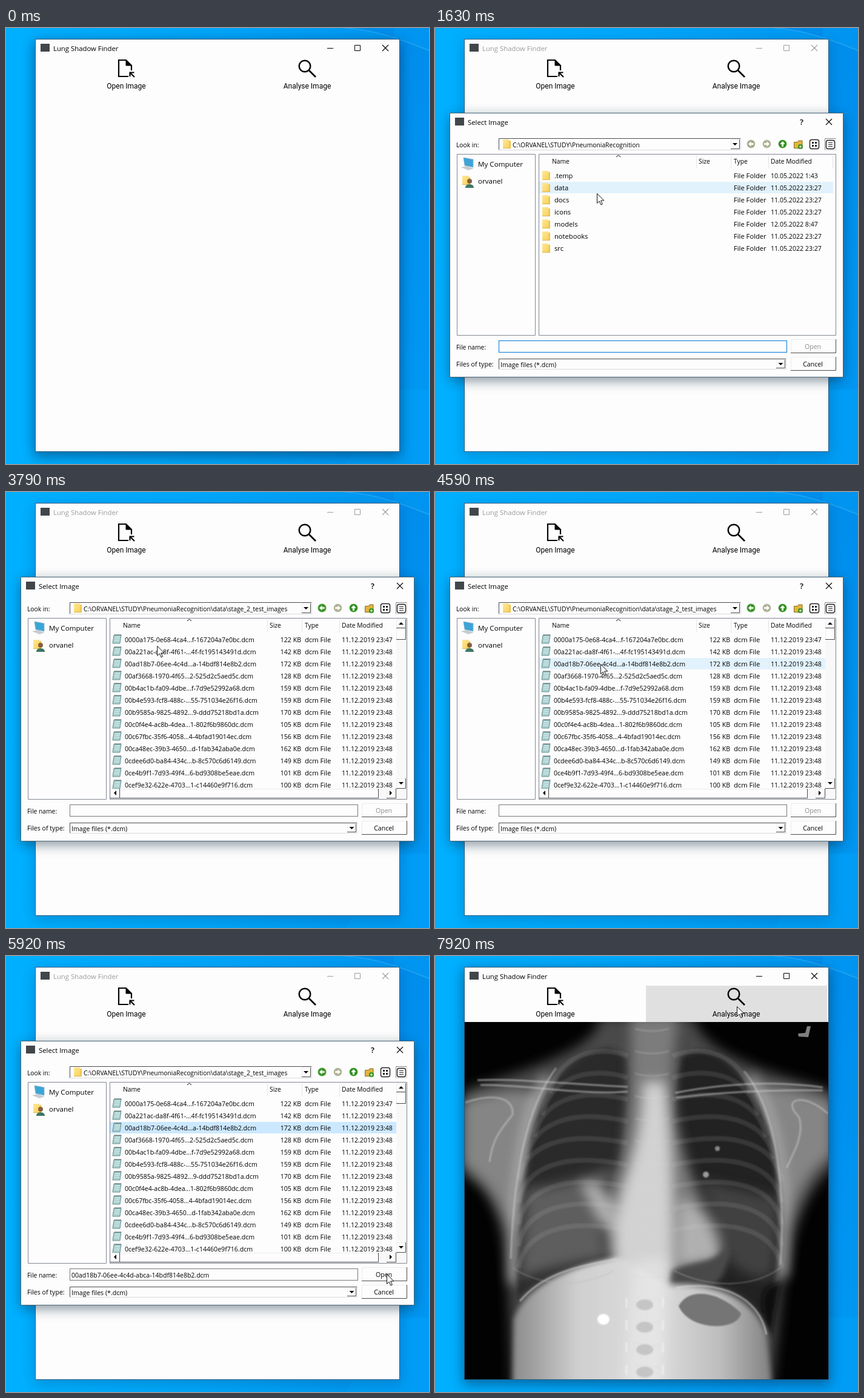
Write an HTML page that moves like this. It is 698x720 px and loops after 8 s.

```html
<!DOCTYPE html>
<html lang="en">
<head>
<meta charset="utf-8">
<title>Lung Shadow Finder</title>
<style>
html, body { margin: 0; width: 100%; height: 100%; overflow: hidden; background: #009cf4; }
svg { display: block; }
text { font: 10.6px "Open Sans", "Noto Sans", sans-serif; fill: #000; white-space: pre; }
.label { font: 12px Roboto, sans-serif; text-anchor: middle; }
.cap { font-size: 11.35px; }
.side { font-size: 11.6px; }
.head { font-size: 10.3px; }
.name, .type { font-size: 11.2px; }
.path { font-size: 10.3px; }
.mid { text-anchor: middle; }
.end { text-anchor: end; }
.line { fill: none; stroke: currentColor; }
.off { fill: #8c8c8c; }

/* every layer shares one 8 s clock */
.t { animation: 8s step-end infinite; }
.chrome { color: #000; animation-name: dim; }
.chrome text { fill: currentColor; }
.glow { animation-name: glow; }
.dialog { opacity: 0; animation-name: dialog; animation-timing-function: linear; }
.overOpen { animation-name: overOpen; }
.overAnalyse { animation-name: overAnalyse; }
.root { animation-name: root; }
.data { animation-name: data; }
.test { animation-name: test; }
.went { animation-name: went; }
.focus { animation-name: focus; }
.hot0 { animation-name: hot0; }
.hot1 { animation-name: hot1; }
.hot2 { animation-name: hot2; }
.picked { animation-name: picked; }
.unpicked { animation-name: unpicked; }
.scan { animation-name: scan; }
.pointer { animation: move 8s linear infinite; }

@keyframes dim { 0%, 79.2% { color: #000 } 13.6% { color: #9c9c9c } }
@keyframes glow { 0%, 79.2% { opacity: .6 } 13.6% { opacity: .25 } }
@keyframes dialog { 0%, 13.4% { opacity: 0 } 15%, 78.4% { opacity: 1 } 79.6%, 100% { opacity: 0 } }
@keyframes overOpen { 0%, 13.6% { opacity: 0 } 9.8% { opacity: 1 } }
@keyframes overAnalyse { 0% { opacity: 0 } 92.6%, 100% { opacity: 1 } }
@keyframes root { 0% { opacity: 1 } 31.5%, 100% { opacity: 0 } }
@keyframes data { 0%, 46% { opacity: 0 } 31.5% { opacity: 1 } }
@keyframes test { 0% { opacity: 0 } 46%, 100% { opacity: 1 } }
@keyframes went { 0% { opacity: 0 } 31.5%, 100% { opacity: 1 } }
@keyframes focus { 0% { opacity: 1 } 27%, 100% { opacity: 0 } }
@keyframes hot0 { 0% { opacity: 0 } 19.2%, 100% { opacity: 1 } }
@keyframes hot1 { 0% { opacity: 0 } 37%, 100% { opacity: 1 } }
@keyframes hot2 { 0%, 59.2% { opacity: 0 } 50.5% { opacity: 1 } }
@keyframes picked { 0% { opacity: 0 } 59.2%, 100% { opacity: 1 } }
@keyframes unpicked { 0% { opacity: 1 } 59.2%, 100% { opacity: 0 } }
@keyframes scan { 0% { opacity: 0 } 87%, 100% { opacity: 1 } }
@keyframes move {
  0%, .45% { transform: translate(430px, 732px) }
  6.5% { transform: translate(275px, 270px) }
  10.5% { transform: translate(205px, 82px) }
  14% { transform: translate(206px, 84px) }
  18% { transform: translate(258px, 240px) }
  20.4% { transform: translate(267px, 273px) }
  23%, 29% { transform: translate(260px, 265px) }
  31.5% { transform: translate(254px, 266px) }
  35.5% { transform: translate(242px, 259px) }
  38.6%, 46% { transform: translate(243px, 246px) }
  52%, 55.75% { transform: translate(270px, 280px) }
  57.4%, 60% { transform: translate(273px, 284px) }
  65.5% { transform: translate(435px, 395px) }
  71% { transform: translate(600px, 505px) }
  74%, 79.5% { transform: translate(628px, 525px) }
  83.9% { transform: translate(566px, 460px) }
  89% { transform: translate(521px, 235px) }
  93.25%, 96.9% { transform: translate(499px, 86px) }
  99%, 100% { transform: translate(498px, 83px) }
}
</style>
</head>
<body>
<svg width="698" height="720" viewBox="0 0 698 720">
<defs>
  <linearGradient id="sky">
    <stop offset="0" stop-color="#00b0ff"/><stop offset=".5" stop-color="#00a6fa"/>
    <stop offset="1" stop-color="#0094f0"/>
  </linearGradient>
  <linearGradient id="wave" x1="0" y1="0" x2="0" y2="1">
    <stop offset="0" stop-color="#0088ea"/><stop offset="1" stop-color="#0098f2"/>
  </linearGradient>
  <linearGradient id="gold" x2="1" y2="1">
    <stop offset="0" stop-color="#ffe793"/><stop offset="1" stop-color="#f7cf58"/>
  </linearGradient>
  <linearGradient id="belly">
    <stop offset="0" stop-color="#8a8a8a"/><stop offset=".25" stop-color="#cfcfcf"/>
    <stop offset=".55" stop-color="#dedede"/><stop offset=".8" stop-color="#bdbdbd"/>
    <stop offset="1" stop-color="#808080"/>
  </linearGradient>
  <filter id="b1"><feGaussianBlur stdDeviation="1.2"/></filter>
  <filter id="b4" x="-30%" y="-30%" width="160%" height="160%"><feGaussianBlur stdDeviation="4"/></filter>
  <filter id="b10" x="-40%" y="-40%" width="180%" height="180%"><feGaussianBlur stdDeviation="10"/></filter>
  <clipPath id="plate"><path d="M49 109H649V699H49z"/></clipPath>
  <g id="folder">
    <path d="M0 0H10V2H13V15H0z" fill="url(#gold)"/><path d="M10.5 2V15H13V2z" fill="#edc552"/>
    <path d="M0 14.5H13" stroke="#dcb648"/>
  </g>
  <g id="note">
    <path d="M2 1.5H14L12 15H0z" fill="#a8d0cf" stroke="#6a8f92"/>
    <path d="M4 4.5H12M3.5 7.5H11.5M3 10.5H11" stroke="#dff0ee"/>
    <path d="M3 1H14" stroke="#566266" stroke-width="2" stroke-dasharray="1 1"/>
  </g>
  <g id="arrow">
    <circle r="7" stroke="#fff" stroke-opacity=".5"/>
    <path d="M-4.5 0L0-4.3V-1.6H4.2V1.6H0V4.3z" fill="#fff"/>
  </g>
  <path id="down" d="M-4-2H4L0 2z"/>
  <g id="cross"><path class="line" d="M-5-5L5 5M5-5L-5 5" stroke-width="1.1"/></g>
</defs>

<rect width="698" height="720" fill="url(#sky)"/>
<path d="M560 0C620 5 660 22 698 38V597H640V0z" fill="url(#wave)" opacity=".6"/>
<path d="M640 597H698V720H560z" fill="#00a2f8" opacity=".6"/>
<path d="M560 0C615 4 655 20 698 37" fill="none" stroke="#48b8fa" stroke-width="1.5" opacity=".5"/>

<rect class="t glow" x="46" y="22" width="606" height="686" fill="#003c6c" filter="url(#b10)"/>
<rect x="48.5" y="18.5" width="601" height="681" fill="#fdfdfd" stroke="#235a80"/>

<rect class="t overOpen" x="49" y="49" width="299" height="60" fill="#e0e0e0"/>
<rect class="t overAnalyse" x="348" y="49" width="299" height="60" fill="#e0e0e0"/>

<g class="t chrome">
  <rect x="57" y="26" width="15" height="13" fill="#41464a"/>
  <text class="cap" x="78" y="38">Lung Shadow Finder</text>
  <path class="line" d="M530 33.5H540M575.5 28.5H584.5V37.5H575.5z"/>
  <use href="#cross" x="626" y="33"/>
</g>
<g fill="none" stroke="#050505" stroke-width="2.2">
  <path d="M202 80H186V53H198L207 62V70"/>
  <path d="M198 53V62H207z" fill="#050505" stroke-width="1"/>
  <path d="M212 81L205 74M204.5 80V73.5H211.5"/>
  <circle cx="493" cy="63" r="9.3" stroke-width="2.5"/>
  <path d="M499.5 69.5L511 81" stroke-width="2.7"/>
</g>
<text class="label" x="198.5" y="100">Open Image</text>
<text class="label" x="497" y="100">Analyse Image</text>

<g class="t scan" clip-path="url(#plate)">
  <path d="M49 109H649V699H49z" fill="#020202"/>
  <path d="M272 100C270 150 175 180 49 222V362C95 385 112 440 120 520L128 710H556L572 560C585 480 600 400 655 350V222C540 190 440 160 426 100z" fill="#4a4a4a" filter="url(#b10)"/>
  <g filter="url(#b10)">
    <path d="M45 240C100 225 150 215 170 230C145 290 135 350 135 480C105 410 100 380 45 345zM655 240C600 220 540 210 525 220C560 280 580 360 578 470C595 390 620 350 655 330z" fill="#858585"/>
    <path d="M185 200C145 280 130 400 130 540M520 200C562 270 580 390 573 530" fill="none" stroke="#b4b4b4" stroke-width="15"/>
  </g>
  <g filter="url(#b4)">
    <path d="M290 152C215 155 170 235 154 330C142 420 139 480 134 572C165 525 235 512 298 500C270 450 280 390 304 340C318 270 326 190 315 165z" fill="#2c2c2c"/>
    <path d="M405 168C470 125 535 220 558 320C574 410 569 500 548 622C530 560 470 532 392 540C380 440 388 340 392 260z" fill="#232323"/>
  </g>
  <g filter="url(#b10)">
    <path d="M150 385C205 380 260 365 296 345C268 420 270 470 290 498C220 508 165 520 140 535z" fill="#6c6c6c" opacity=".8"/>
    <path d="M440 370L566 400C570 460 560 510 555 530C525 535 500 520 485 500z" fill="#505050" opacity=".7"/>
    <path d="M322 100H402C388 190 392 240 402 290C416 350 430 390 460 440C480 480 478 515 456 534H316C272 470 278 420 306 350C320 280 326 190 322 100z" fill="#7c7c7c"/>
    <path d="M345 210H378C388 300 394 390 390 560H300C290 470 300 415 322 350C338 300 345 260 345 210z" fill="#d2d2d2"/>
    <path d="M240 370C275 375 300 400 300 455C270 450 262 415 240 370zM405 400C440 420 465 450 470 500L400 510z" fill="#b0b0b0"/>
  </g>
  <g filter="url(#b4)">
    <path d="M390 520C430 500 465 510 484 475C484 505 475 530 460 541H388z" fill="#4a4a4a"/>
    <path d="M130 600C150 545 220 512 306 497L388 545C450 538 525 560 547 625L556 710H128z" fill="url(#belly)"/>
    <path d="M550 620C535 570 535 545 570 540L552 640z" fill="#0c0c0c"/>
  </g>
  <path d="M330 500H386L376 710H310z" fill="#efefef" opacity=".45" filter="url(#b10)"/>
  <g filter="url(#b1)">
    <path d="M402 578C420 545 470 555 505 590C500 620 420 620 402 578z" fill="#747474"/>
    <path d="M140 570C180 522 240 512 300 500M398 548C465 535 535 560 547 625" fill="none" stroke="#e2e2e2" stroke-width="3" opacity=".55"/>
    <path d="M128 515C175 545 235 550 295 520M395 520C460 552 530 545 570 515" fill="none" stroke="#bbb" stroke-width="2" opacity=".35"/>
    <g id="ribs" fill="none" stroke="#d4d4d4"></g>
    <path d="M70 205C140 202 220 212 318 216M75 213C150 212 240 230 318 224M640 217C570 207 490 208 396 226M640 222C570 221 480 224 398 234" fill="none" stroke="#cbcbcb" stroke-width="3" opacity=".55"/>
    <path d="M50 242C100 225 130 235 128 262C110 285 95 300 90 340M648 260C610 225 570 235 600 265C610 290 595 320 580 350M200 185C150 250 130 360 125 500M510 190C560 250 580 370 570 510" fill="none" stroke="#dedede" stroke-width="3" opacity=".4"/>
    <ellipse cx="278" cy="600" rx="10" ry="9" fill="#fff"/>
    <circle cx="466" cy="318" r="4" fill="#888"/><circle cx="447" cy="361" r="5" fill="#9a9a9a"/>
  </g>
  <path d="M614 116H620L616 134L600 133L599 128L611 127z" fill="#808080"/>
</g>

<g class="t dialog">
  <rect x="25" y="146" width="648" height="436" fill="#10283c" opacity=".5" filter="url(#b10)"/>
  <rect x="24.5" y="140.5" width="649" height="436" fill="#fdfdfd" stroke="#4a6678"/>
  <rect x="33" y="148" width="15" height="13" fill="#41464a"/>
  <text class="cap" x="54" y="160">Select Image</text>
  <text class="mid" x="605" y="159.5" style="font-size:13px;font-weight:600">?</text>
  <use href="#cross" x="650" y="155"/>

  <text class="head" x="35" y="197">Look in:</text>
  <g id="boxes"></g>
  <use href="#folder" x="112" y="184"/>
  <text class="path t root" x="128" y="197">C:\ORVANEL\STUDY\PneumoniaRecognition</text>
  <text class="path t data" x="128" y="197">C:\ORVANEL\STUDY\PneumoniaRecognition\data</text>
  <text class="path t test" x="128" y="197">C:\ORVANEL\STUDY\PneumoniaRecognition\data\stage_2_test_images</text>

  <use href="#arrow" x="521.5" y="191.5" fill="#a6ac8c"/>
  <use class="t went" href="#arrow" x="521.5" y="191.5" fill="#2f8f1c"/>
  <use href="#arrow" transform="translate(547.5 191.5) rotate(180)" fill="#aeb294"/>
  <use href="#arrow" transform="translate(573.5 191.5) rotate(90)" fill="#2f8f1c"/>
  <path d="M592.5 188.5H598L600 186H606V198.5H592.5z" fill="#e0b53e" stroke="#8b6d22"/>
  <circle cx="603" cy="196" r="4" fill="#2f8f1c"/><path d="M600.5 196H605.5M603 193.5V198.5" stroke="#fff"/>
  <rect x="618.5" y="184.5" width="15" height="15" rx="3" fill="#fff" stroke="#222" stroke-width="1.4"/>
  <path d="M622 188h3v3h-3zM627 188h3v3h-3zM622 193h3v3h-3zM627 193h3v3h-3z" fill="#222"/>
  <path d="M643.5 201V182.5H661" fill="none" stroke="#8a8a8a"/><path d="M661.5 182V201.5H643" fill="none" stroke="#d8d8d8"/>
  <rect x="645.5" y="185.5" width="14" height="14" rx="3" fill="#fff" stroke="#222" stroke-width="1.4"/>
  <path d="M649 189.5H656M649 192.5H656M649 195.5H656" stroke="#222"/>

  <path d="M36.5 208.5H165.5V507.5H36.5zM171.5 208.5H661.5V507.5H171.5z" fill="#fdfdfd" stroke="#828790"/>
  <path d="M47 214L63 217V230L49 227z" fill="#3aa5d8" stroke="#8fb8cc"/><path d="M43 230L52 228L64 232L55 235z" fill="#c6ccd0"/>
  <text class="side" x="71" y="229">My Computer</text>
  <use href="#folder" x="45" y="244"/>
  <circle cx="57" cy="253" r="4" fill="#8a6039"/><path d="M50 264C50 256 64 256 64 264z" fill="#3f7565"/>
  <text class="side" x="71" y="257">orvanel</text>

  <path d="M431.5 210V232M488.5 210V232M550.5 210V232M656.5 210V232" stroke="#e5e5e5"/>
  <path class="line" d="M299 213L302.5 210L306 213" stroke="#555"/>
  <text class="head" x="193" y="224">Name</text><text class="head" x="435" y="224">Size</text>
  <text class="head" x="493" y="224">Type</text><text class="head" x="554" y="224">Date Modified</text>
  <g id="lists"></g>

  <text class="head" x="35" y="531">File name:</text>
  <rect x="105.5" y="516.5" width="475" height="19" fill="#fdfdfd" stroke="#7a7a7a"/>
  <rect class="t focus" x="105.5" y="516.5" width="475" height="19" fill="none" stroke="#0078d7"/>
  <text class="t picked" x="108" y="531" style="font-size:10.5px">00ad18b7-06ee-4c4d-abca-14bdf814e8b2.dcm</text>
  <text x="35" y="559">Files of type:</text>
  <text x="108" y="560">Image files (*.dcm)</text>
  <text class="mid off t unpicked" x="623.5" y="530">Open</text>
  <text class="mid t picked" x="623.5" y="530">Open</text>
  <text class="mid" x="623.5" y="559">Cancel</text>
</g>

<path class="pointer" d="M.5.5V16.5L4.2 13L6.8 19L9.3 18L6.7 12H11.8z" fill="#fff" stroke="#111"/>
</svg>
<script>
const fill = (id, html) => { document.getElementById(id).innerHTML = html; };
const text = (cls, x, y, s) => `<text class="${cls}" x="${x}" y="${y}">${s}</text>`;
const use = (id, x, y) => `<use href="#${id}" x="${x}" y="${y}"/>`;

// bevelled boxes in the classic style
function bevel(x, y, w, h, light, dark) {
  const r = x + w - .5, b = y + h - .5;
  return `<path d="M${x} ${y}h${w}v${h}h${-w}z" fill="#fdfdfd"/>
    <path d="M${x + .5} ${b}V${y + .5}H${r}" fill="none" stroke="${light}"/>
    <path d="M${x} ${b}H${r}V${y}" fill="none" stroke="${dark}"/>`;
}
const raised = (x, y, w, h) => bevel(x, y, w, h, "#ececec", "#4c4c4c");
const sunken = (x, y, w, h) => bevel(x, y, w, h, "#4c4c4c", "#dadada");

fill("boxes",
  sunken(105, 182, 400, 20) + raised(488, 184, 15, 16) + use("down", 495, 192) +
  sunken(105, 546, 475, 18) + raised(563, 548, 15, 14) + use("down", 570.5, 555) +
  raised(587, 514, 75, 23) + raised(587, 543, 75, 23));

const bar = (cls, row, right, color) =>
  `<rect class="t ${cls}" x="172" y="${234 + row * 20}" width="${right - 172}" height="19" fill="${color}"/>`;
const hover = "#e2f2fd", chosen = "#cce8ff";

function folders(rows) {
  return rows.map(([name, date], i) => {
    const y = 248 + i * 20;
    return use("folder", 177, y - 12) + text("name", 197, y, name) +
      text("type", 493, y, "File Folder") + text("", 554, y, date);
  }).join("");
}

function files(rows) {
  return rows.map(([name, size], i) => {
    const y = 248 + i * 20;
    return use("note", 176, y - 13) + text("", 196, y, name + ".dcm") +
      text("end", 487, y, size + " KB") + text("type", 493, y, "dcm File") +
      text("", 554, y, "11.12.2019 23:4" + (i ? 8 : 7));
  }).join("");
}

const late = "11.05.2022 23:27";
const project = folders([[".temp", "10.05.2022 1:43"], ["data", late], ["docs", late], ["icons", late],
  ["models", "12.05.2022 8:47"], ["notebooks", late], ["src", late]]);
const stages = folders([["stage_2_test_images", "08.05.2022 23:48"], ["stage_2_train_images", "08.05.2022 23:52"]]);
const scans = files([
  ["0000a175-0e68-4ca4...f-167204a7e0bc", 122], ["00a221ac-da8f-4f61-...4f-fc195143491d", 142],
  ["00ad18b7-06ee-4c4d...a-14bdf814e8b2", 172], ["00af3668-1970-4f65...2-525d2c5aed5c", 128],
  ["00b4ac1b-fa09-4dbe...f-7d9e52992a68", 159], ["00b4e593-fcf8-488c-...55-751034e26f16", 159],
  ["00b9585a-9825-4892...9-ddd75218bd1a", 170], ["00c0f4e4-ac8b-4dea...1-802f6b9860dc", 105],
  ["00c67fbc-35f6-4058...4-4bfad19014ec", 156], ["00ca48ec-39b3-4650...d-1fab342aba0e", 162],
  ["0cdee6d0-ba84-434c...b-8c570c6d6149", 149], ["0ce4b9f1-7d93-49f4...6-bd9308be5eae", 101],
  ["0cef9e32-622e-4703...1-c14460e9f716", 100]]);

const turned = (x, y, a) => `<use href="#down" transform="translate(${x} ${y}) rotate(${a})"/>`;
const bars = `<path d="M644 209H661V507H172V490H644z" fill="#f8f8f8"/>` +
  raised(644, 210, 16, 15) + raised(644, 225, 16, 19) + raised(644, 473, 16, 17) +
  raised(172, 490, 16, 16) + raised(188, 490, 427, 16) + raised(628, 490, 16, 16) +
  turned(652, 217, 180) + turned(652, 481, 0) + turned(180, 497, 90) + turned(635, 497, -90);

fill("lists",
  `<g class="t root">${bar("hot0", 1, 657, hover)}${project}</g>` +
  `<g class="t data">${bar("hot1", 0, 657, hover)}${stages}</g>` +
  `<g class="t test">${bar("hot2", 2, 645, hover)}${bar("picked", 2, 645, chosen)}${scans}${bars}</g>`);

// ribs arch away from the spine; vertebrae run below
let bones = "";
for (let i = 0; i < 9; i++) {
  const y = 165 + i * 36, s = Math.min(i, 4) * 13;
  bones += `<path stroke-width="8" opacity=".12" d="M318 ${y}C${260 - s} ${y - 22} ${200 - s} ${y + 5} ${190 - s} ${y + 62}
    M392 ${y}C${450 + s} ${y - 22} ${510 + s} ${y + 5} ${520 + s} ${y + 62}"/>`;
}
for (let i = 0; i < 16; i++) {
  const y = 120 + i * 37;
  bones += `<path stroke-width="3" opacity=".2" d="M330 ${y}Q358 ${y + 8} 386 ${y}"/>`;
  if (y > 550) bones += `<path stroke="#fff" stroke-width="3" opacity=".45" d="M316 ${y}v17M376 ${y}v17"/>
    <ellipse cx="346" cy="${y + 12}" rx="14" ry="9" fill="#b0b0b0" stroke="none" opacity=".6"/>`;
}
fill("ribs", bones);
</script>
</body>
</html>
```
